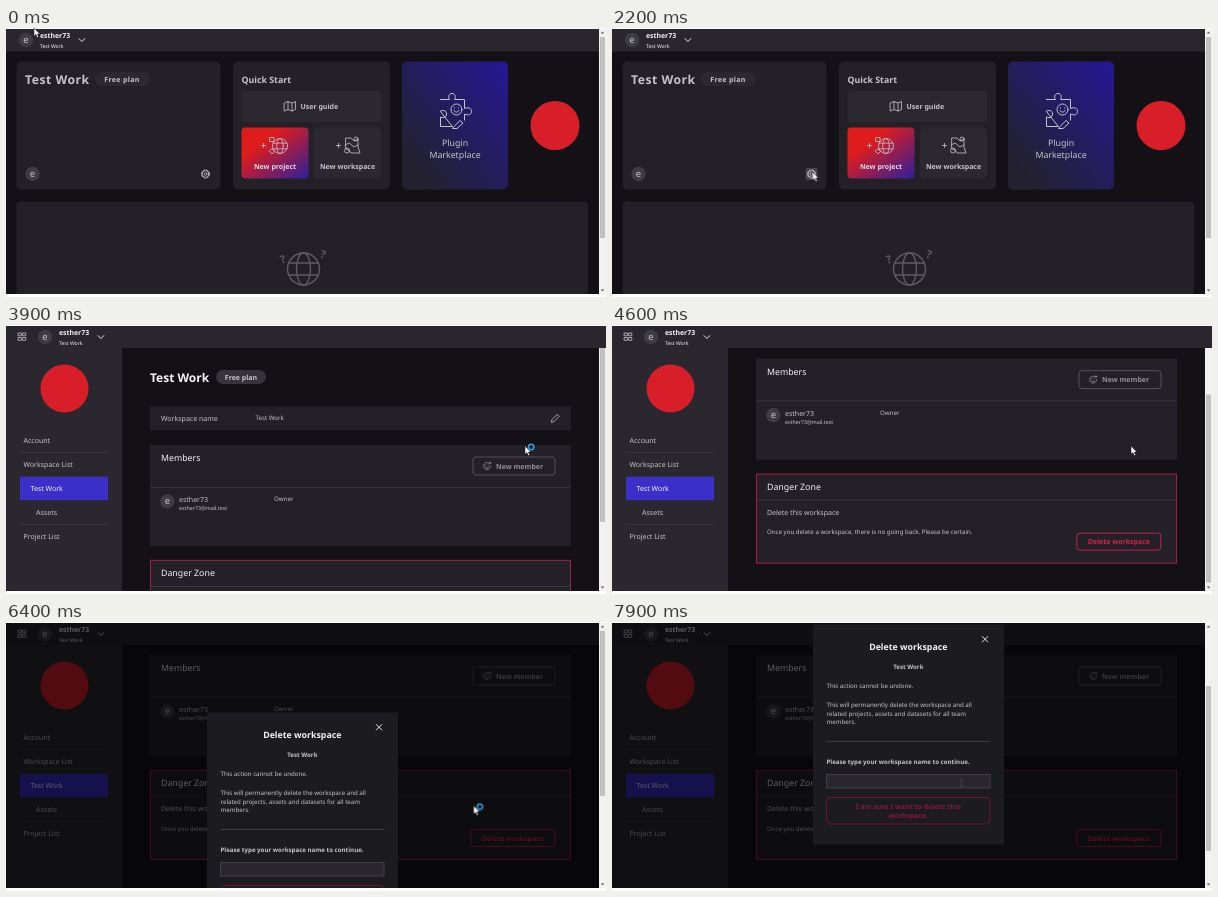
Recreate the animation shown at these times as an HTML page. Size 600 px wide and 269 px high, loop 8000 ms.

```html
<!DOCTYPE html>
<html lang="en">
<head>
<meta charset="utf-8">
<title>Delete a workspace</title>
<style>
html, body { margin: 0; width: 100%; height: 100%; overflow: hidden; background: #fff; }
svg { display: block; width: 600px; height: 269px; }
text { font-family: "Noto Sans", "Open Sans", sans-serif; font-size: 7px; fill: #c6c4ca; text-rendering: geometricPrecision; }
.b { font-weight: 700; }
.m { font-weight: 500; }
.mid { text-anchor: middle; }
.white, .white text { fill: #f4f3f6; }
.card { fill: #232127; }
.tile { fill: #2b292f; }
.line { stroke: #3b3940; stroke-width: .8; }
.icon { fill: none; stroke: #c6c4ca; stroke-width: .8; stroke-linecap: round; stroke-linejoin: round; }
.small { font-size: 6.15px; }
.head { font-size: 8.8px; }
.logo { fill: #d81e28; }
.track { fill: #f1f1f1; }
.grip { fill: #c1c1c1; }
.no { fill: #86183a; }

.anim, .swap { animation: 8s linear infinite both; }
.swap { animation-timing-function: step-end; }

.home { animation-name: home; }
.settings { animation-name: settings; }
.gear { animation-name: gear; }
.hot, .hand { animation-name: hot; }
.arrow { animation-name: arrow; }
.beam { animation-name: beam; }
.ring { animation-name: ring; }
.page { animation-name: page; }
.thumb { animation-name: thumb; }
.veil { animation-name: veil; }
.modal { animation-name: modal; }
.dialog { animation-name: dialog; }
.dialog-thumb { animation-name: dialog-thumb; }
.pointer { animation-name: pointer; }

@keyframes home { 0% { visibility: visible } 30.6%, 100% { visibility: hidden } }
@keyframes settings { 0% { visibility: hidden } 30.6%, 100% { visibility: visible } }
@keyframes gear { 0% { fill: #232127 } 25.6%, 100% { fill: #47454c } }
@keyframes hot { 0% { visibility: hidden } 66.2% { visibility: visible } 72%, 100% { visibility: hidden } }
@keyframes arrow { 0% { visibility: visible } 66.2% { visibility: hidden } 72% { visibility: visible } 96.2%, 100% { visibility: hidden } }
@keyframes beam { 0% { visibility: hidden } 96.2%, 100% { visibility: visible } }
@keyframes ring { 0% { visibility: hidden } 46.2% { visibility: visible } 50% { visibility: hidden } 74.9% { visibility: visible } 82.4%, 100% { visibility: hidden } }
@keyframes modal { 0% { visibility: hidden } 72.5%, 100% { visibility: visible } }
@keyframes veil { 0%, 72% { opacity: 0 } 75%, 100% { opacity: 1 } }
@keyframes page {
  0%, 50% { transform: none; animation-timing-function: ease-in-out }
  58%, 100% { transform: translateY(-87px) }
}
@keyframes thumb {
  0%, 50% { transform: none; animation-timing-function: ease-in-out }
  58%, 100% { transform: translateY(61px) }
}
@keyframes dialog {
  0%, 83.7% { transform: none; animation-timing-function: ease-in-out }
  91.8%, 100% { transform: translateY(-88px) }
}
@keyframes dialog-thumb {
  0%, 83.7% { transform: none; animation-timing-function: ease-in-out }
  91.8%, 100% { transform: translateY(55px) }
}
@keyframes pointer {
  0%, 1% { transform: translate(28px, 0) }
  11.25% { transform: translate(196px, 142px) }
  16.25% { transform: translate(220px, 190px) }
  18.75% { transform: translate(221px, 194px) }
  22.5% { transform: translate(208px, 165px) }
  26.25%, 33.75% { transform: translate(200.5px, 144px) }
  40% { transform: translate(365px, 198px) }
  45% { transform: translate(514px, 128px) }
  47.5%, 58.75% { transform: translate(519px, 121px) }
  67%, 72% { transform: translate(499px, 213px) }
  79%, 90.6% { transform: translate(467.6px, 183.7px) }
  97.5%, 100% { transform: translate(349.5px, 161px) }
}
</style>
</head>
<body>
<svg viewBox="0 0 600 269">
  <defs>
    <linearGradient id="warm" x1="0" y1="0" x2="1" y2="1">
      <stop offset=".3" stop-color="#df1c1c"/><stop offset="1" stop-color="#2b209c"/>
    </linearGradient>
    <linearGradient id="cool" x1="0" y1="1" x2="1" y2="0">
      <stop offset=".15" stop-color="#232130"/><stop offset="1" stop-color="#261796"/>
    </linearGradient>
    <g id="avatar">
      <circle r="7.2" fill="#3f3d44"/>
      <text class="mid" y="2.9" style="font-size:9.5px">e</text>
    </g>
    <g id="globe" fill="none">
      <circle r="16"/><ellipse rx="7" ry="16"/>
      <path d="M-15-6H15M-15 6H15"/>
    </g>
    <g id="account">
      <use href="#avatar"/>
      <g class="white">
        <text class="b" x="14" y="-2" style="font-size:6.9px">esther73</text>
        <text class="m" x="14" y="7.8" style="font-size:5.1px">Test Work</text>
      </g>
      <path class="icon" d="M53-1.4l2.9 2.9 2.9-2.9" style="stroke:#e6e5e8;stroke-width:1"/>
    </g>
    <path id="arrows" d="M594.7 5.5h3.6l-1.8-2zM594.7 261.5h3.6l-1.8 2z" fill="#606060"/>
  </defs>

  <rect width="600" height="269" fill="#fff"/>
  <rect y="1" width="593" height="265" fill="#131116"/>

  <!-- Dashboard -->
  <g class="swap home">
    <rect y="1" width="593" height="22.5" fill="#29272d"/>
    <use href="#account" x="20" y="12"/>

    <rect class="card" x="10.5" y="33.5" width="204" height="128" rx="5"/>
    <text class="b" x="19" y="55.5" style="font-size:12.2px;letter-spacing:.5px">Test Work</text>
    <rect class="tile" x="89" y="44" width="55" height="14" rx="7"/>
    <text class="b mid" x="116" y="53.5" style="letter-spacing:.35px">Free plan</text>
    <use href="#avatar" x="26.5" y="146"/>
    <rect class="swap gear" x="193.5" y="140" width="12" height="12" rx="2"/>
    <g class="icon" transform="translate(199.5 146)">
      <circle r="3.4"/><circle r="1.4"/>
      <circle r="4.1" stroke-dasharray="1.7 1.52"/>
    </g>

    <rect class="card" x="227" y="33.5" width="157" height="128" rx="5"/>
    <text class="b head" x="235.5" y="55">Quick Start</text>
    <rect class="tile" x="235.5" y="63" width="140" height="31" rx="4"/>
    <path class="icon" d="M278.5 75l3.5-1.5 4 1.5 3.5-1.5v8l-3.5 1.5-4-1.5-3.5 1.5zM282 73.5v8M286 75v8"/>
    <text class="b" x="294.5" y="81.2">User guide</text>

    <rect x="235.5" y="99.5" width="67" height="51" rx="4" fill="url(#warm)"/>
    <g class="icon">
      <path d="M255.5 117.5h4M257.5 115.5v4M264 109.5h4v4h-4zM266 121l2.5 2.5-2.5 2.5-2.5-2.5z"/>
      <use href="#globe" transform="translate(274 118) scale(.47)" style="stroke-width:1.7"/>
    </g>
    <text class="b mid" x="269" y="141" style="fill:#e0d9e0">New project</text>

    <rect class="tile" x="308" y="99.5" width="67" height="51" rx="4"/>
    <g class="icon">
      <path d="M330.5 117.5h4M332.5 115.5v4M340 110h5l3 3 4-2v8l2 6h-9l-2-3-3-1z"/>
      <circle cx="341" cy="122.5" r="2.5"/><circle cx="350" cy="111" r="2"/>
      <path d="M339 117l4-2 5 4 4-2"/>
    </g>
    <text class="b mid" x="341.5" y="141">New workspace</text>

    <rect x="396" y="33.5" width="106" height="128" rx="5" fill="url(#cool)"/>
    <g class="icon" style="stroke-width:1">
      <path d="M434.5 71.5h9c-1.8-3.2-.3-6 2.5-6s4.3 2.8 2.5 6h10v9c4-1.8 7-.3 7 2.8s-3 4.6-7 2.8v6M446 98.5h-11.5v-9.5c3.8 1.5 6-.2 6-3s-2.2-4.5-6-3zM448 98.5l6-6 3 2.5-6 5.5h-4z"/>
      <circle cx="450.5" cy="81.5" r="5.5"/>
      <path d="M448 82.5c1 2.2 4 2.2 5 0M448.5 79.8v.2M452.5 79.8v.2"/>
    </g>
    <text class="mid head" x="449" y="118">Plugin</text>
    <text class="mid head" x="449" y="130">Marketplace</text>
    <circle class="logo" cx="549" cy="97.5" r="24.5"/>

    <path class="card" d="M10.5 266V178.5q0-5 5-5H577q5 0 5 5V266z"/>
    <g stroke="#5e5c62" stroke-width="1.4">
      <use href="#globe" x="297.5" y="241"/>
    </g>
    <g class="b mid">
      <text transform="translate(278 235) rotate(-18)" style="font-size:11px;fill:#5e5c62">?</text>
      <text transform="translate(316 230) rotate(16)" style="font-size:11px;fill:#5e5c62">?</text>
    </g>
    <rect class="track" x="593" y="1" width="7" height="265"/>
    <rect class="grip" x="594" y="9" width="5" height="201"/>
    <use href="#arrows"/>
  </g>

  <!-- Workspace settings -->
  <g class="swap settings">
    <g class="anim page">
      <text class="b white" x="144" y="57" style="font-size:12px">Test Work</text>
      <rect x="210" y="45" width="50" height="14" rx="7" fill="#36343a"/>
      <text class="b mid" x="235" y="54.5">Free plan</text>

      <rect class="card" x="144" y="81.5" width="421" height="24"/>
      <text x="155" y="96">Workspace name</text>
      <text class="small" x="249.5" y="95.3">Test Work</text>
      <path class="icon" d="M545.5 97l.6-2.6 5-5 2 2-5 5z"/>

      <rect class="card" x="144" y="120" width="421" height="101"/>
      <text class="m white head" x="155" y="136">Members</text>
      <rect x="467" y="132" width="82" height="18" rx="3" fill="none" stroke="#58565d" stroke-width=".9"/>
      <path class="icon" d="M484.7 141a3.5 3.5 0 1 1-2.3-3.3M479.5 142.3c.7 1 2.3 1 3 0M479.8 140v.2M482.2 140v.2M484 137v2M483 138h2" style="stroke:#929097"/>
      <text class="b" x="490" y="143.5" style="fill:#929097">New member</text>
      <path class="line" d="M144 162.3H565"/>
      <use href="#avatar" x="161.3" y="176.5"/>
      <text x="173" y="177.3">esther73</text>
      <text x="173" y="185" style="font-size:5.3px">esther73@mail.test</text>
      <text class="small" x="268" y="176">Owner</text>

      <rect class="card" x="144.5" y="235.3" width="420" height="89.2" stroke="#b41f44" stroke-width=".9"/>
      <text class="m white head" x="155" y="251">Danger Zone</text>
      <path class="line" d="M145 261.5H564"/>
      <text x="155" y="276">Delete this workspace</text>
      <text class="small" x="155" y="295.5">Once you delete a workspace, there is no going back. Please be certain.</text>
      <rect x="464.8" y="294.5" width="84" height="17" rx="3" fill="none" stroke="#d3224d" stroke-width=".9"/>
      <text class="b mid" x="506.8" y="305.5" style="fill:#d3224d">Delete workspace</text>
      <g class="swap hot">
        <rect x="464.4" y="294" width="84.8" height="18" rx="3.5" fill="#df2450"/>
        <text class="b mid white" x="506.8" y="305.5">Delete workspace</text>
      </g>
    </g>

    <rect y="23" width="116" height="243" fill="#2a282e"/>
    <circle class="logo" cx="58.5" cy="63.5" r="24"/>
    <path class="line" d="M14 127.5H102M14 199.5H102"/>
    <text x="17.5" y="118">Account</text>
    <text x="17.5" y="142.3">Workspace List</text>
    <rect x="14" y="151.7" width="88" height="23.5" fill="#3b2fc9"/>
    <text class="white" x="24.5" y="166">Test Work</text>
    <text x="30" y="190">Assets</text>
    <text x="17.5" y="214.3">Project List</text>

    <rect class="track" x="593" y="1" width="7" height="265"/>
    <rect class="anim thumb grip" x="594" y="9" width="5" height="188"/>
    <use href="#arrows"/>

    <!-- The header spans the stage and covers the scrollbar's top -->
    <rect y="1" width="600" height="22" fill="#29272d"/>
    <path class="icon" d="M12.5 8h2.8v2.8h-2.8zM17 8h2.8v2.8h-2.8zM12.5 12.5h2.8v2.8h-2.8zM17 12.5h2.8v2.8h-2.8z"/>
    <use href="#account" x="39" y="12"/>
  </g>

  <!-- Confirmation dialog -->
  <g class="swap modal">
    <g class="anim veil">
      <rect y="1" width="593" height="265" fill="#000" opacity=".62"/>
      <g class="anim dialog">
        <rect x="201" y="90.5" width="191" height="220" fill="#1c1b1f"/>
        <text class="b mid white head" x="296.3" y="115.5">Delete workspace</text>
        <path class="icon" d="M370.3 102.5l5.5 5.5M375.8 102.5l-5.5 5.5" style="stroke:#e6e5e8;stroke-width:1"/>
        <text class="b mid small" x="296.3" y="135.3">Test Work</text>
        <g transform="translate(214.5)">
          <text class="small" y="154.3">This action cannot be undone.</text>
          <text class="small" y="173">This will permanently delete the workspace and all</text>
          <text class="small" y="181.5">related projects, assets and datasets for all team</text>
          <text class="small" y="190">members.</text>
          <path class="line" d="M0 207.5H164" style="stroke:#47454b"/>
          <text class="b small" y="229.5">Please type your workspace name to continue.</text>
          <rect y="240.5" width="163.5" height="13.5" fill="#29272d" stroke="#454349" stroke-width=".9"/>
          <rect y="263.5" width="163.5" height="26.5" rx="4" fill="none" stroke="#7a1632" stroke-width=".9"/>
        </g>
        <text class="b mid no" x="296.3" y="274.5">I am sure I want to delete this</text>
        <text class="b mid no" x="296.3" y="283.7">workspace.</text>
      </g>
    </g>
    <rect class="track" x="593" y="1" width="7" height="265"/>
    <rect class="anim dialog-thumb grip" x="594" y="9" width="5" height="165"/>
    <use href="#arrows"/>
  </g>

  <path d="M0 0H600V1H0zM0 266H600V269H0z" fill="#fff"/>

  <g class="anim pointer">
    <path class="swap arrow" d="M0 0v8.3l1.9-1.7 1.4 3 1.4-.7-1.4-2.8h2.6z" fill="#fff" stroke="#111" stroke-width=".5"/>
    <path class="swap hand" d="M-.8.5q.9-1.2 1.7 0v3l3.3.9q.8.3.6 1.3l-.7 3.3h-4l-2.7-3.3q.2-1.2 1.8 0z" fill="#fff" stroke="#111" stroke-width=".5"/>
    <path class="swap beam" d="M-1.3-3.2h2.6M0-3.2v6.400M-1.3 3.2h2.6" stroke="#5b595f" stroke-width=".6"/>
    <circle class="swap ring" cx="6.2" cy="1" r="2.7" fill="none" stroke="#2ba4e6" stroke-width="1.5"/>
  </g>
</svg>
</body>
</html>
```
